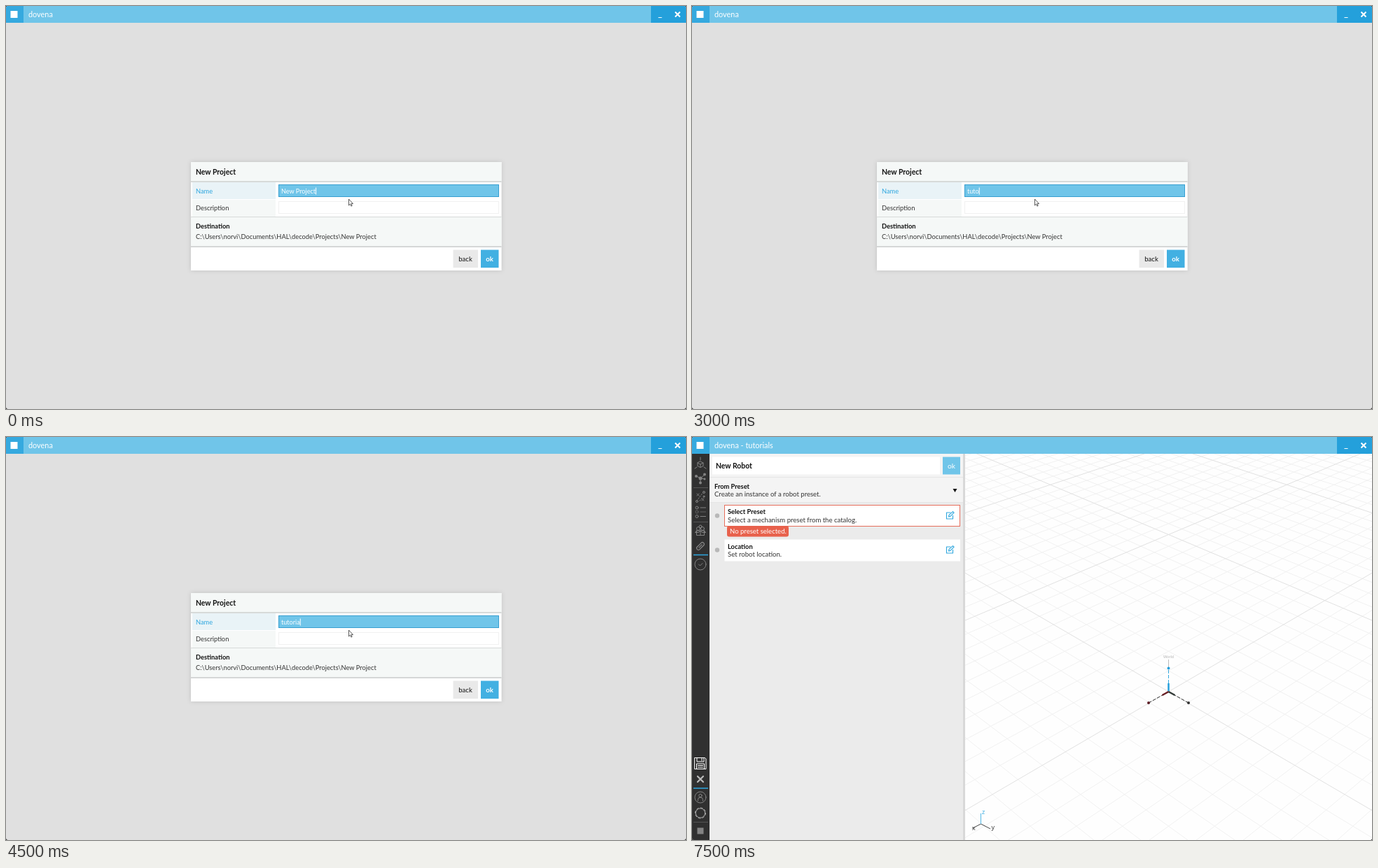
These frames come from a looping animation (971x576 px, 8000 ms). An HTML page:

```html
<!DOCTYPE html>
<html lang="en">
<head>
<meta charset="utf-8">
<title>New project dialog</title>
<style>
  html, body { margin: 0; width: 100%; height: 100%; overflow: hidden; background: #222; }
  svg { display: block; width: 100%; height: 100%; }
  text { font: 9.3px Lato, sans-serif; fill: #333; }
  .bold { font-weight: 700; fill: #111; }
  .head { font-size: 10.4px; }
  .title { font-size: 10.9px; fill: #fff; }
  .body { font-size: 9.55px; }
  .light { fill: #fff; }
  .mid { text-anchor: middle; }
  .icon { fill: none; stroke: #fff; stroke-width: 1; stroke-linecap: round; stroke-linejoin: round; }
  .solid { fill: #fff; stroke: none; }
  .minor { stroke: #f1f1f1; }
  .major { stroke: #e1e1e1; }
  .axis { font: 9px "Open Sans", sans-serif; }
</style>
</head>
<body>
<svg viewBox="0 0 971 576">
  <defs>
    <clipPath id="window"><rect width="971" height="576" rx="3"/></clipPath>
    <clipPath id="viewport"><rect x="390" y="24" width="581" height="552"/></clipPath>
    <filter id="shadow" x="-5%" y="-10%" width="110%" height="120%">
      <feDropShadow dx="0" dy="0" stdDeviation="3" flood-opacity=".14"/>
    </filter>
    <g id="edit" fill="none" stroke="currentColor" stroke-width="1.2" stroke-linejoin="round">
      <path d="M1-4H-5V5H4V0"/>
      <path d="M-2 2L-1.4-.6L4-5.4L5.6-3.8L.4 1.4Z"/>
    </g>
  </defs>

  <g clip-path="url(#window)">
    <rect width="971" height="576" fill="#e0e0e0"/>
    <rect width="971" height="24" fill="#70c5e9"/>
    <rect width="25" height="24" fill="#35a9df"/>
    <rect x="6.5" y="7" width="10" height="10" fill="#fff"/>
    <text id="title" class="title" x="32" y="16"></text>
    <rect x="921" width="50" height="24" fill="#24a0db"/>
    <path d="M931.5 16.5h5" stroke="#fff"/>
    <path d="M955.5 8.5l7 7m0-7l-7 7" stroke="#fff" stroke-width="2"/>

    <g id="dialog">
      <rect x="264" y="223" width="443.500" height="155" fill="#fff" filter="url(#shadow)"/>
      <rect x="264" y="223" width="443.500" height="27" fill="#f5f8f7"/>
      <rect x="264" y="250" width="443.500" height="2" fill="#d7dad9"/>
      <text class="bold head" x="271" y="240.500">New Project</text>
      <rect x="266" y="252" width="119" height="24" fill="#e9f3f7"/>
      <rect x="266" y="277" width="119" height="24" fill="#f5f8f7"/>
      <text x="271" y="267.500" style="fill:#2ea6df">Name</text>
      <text x="271" y="292">Description</text>
      <rect x="389.500" y="255.500" width="314" height="17" fill="#70c5e9" stroke="#379fd0"/>
      <rect x="389.500" y="279.500" width="314" height="17" fill="#fff" stroke="#f1f1f1"/>
      <text id="entry" class="light" x="393" y="267.500" style="font-size:9.1px"></text>
      <rect id="caret" y="259.500" width="1" height="10" fill="#fff"/>
      <rect x="264" y="301" width="443.500" height="42" fill="#f5f8f7"/>
      <path d="M264 301.500h443.500" stroke="#d7dad9"/>
      <rect x="264" y="343" width="443.500" height="2" fill="#d5d7d7"/>
      <text class="bold" x="271" y="318">Destination</text>
      <text x="271" y="333">C:\Users\norvi\Documents\HAL\decode\Projects\New Project</text>
      <rect x="638.500" y="348.500" width="35.500" height="25.500" fill="#e9e9e9"/>
      <rect x="678" y="348.500" width="25.500" height="25.500" fill="#42b0e2"/>
      <text class="body mid" x="656" y="365" style="fill:#111">back</text>
      <text class="bold light body mid" x="690.500" y="365" style="fill:#fff">ok</text>
      <path d="M489.500 276v9l2-1.900l1.400 3l1.300-.6l-1.400-2.900h2.700z" fill="#fff" stroke="#333" stroke-width=".8"/>
    </g>

    <g id="workspace">
      <rect x="390" y="24" width="581" height="552" fill="#fefefe"/>
      <g id="grid" clip-path="url(#viewport)"></g>
      <g fill="none" stroke="#333">
        <path id="stem" d="M680.500 318v13"/>
        <path d="M680.500 333v20" stroke="#35a9df" stroke-dasharray="5 2"/>
        <path d="M680.500 364L652 380M680.500 364L709 380" stroke-dasharray="5 2"/>
        <path d="M680.500 364l-9 5" stroke="#6a1f24" stroke-width="2.500"/>
        <path d="M680.500 364l9 5" stroke="#333b38" stroke-width="2.500"/>
        <path d="M680.500 363v-11" stroke="#259fdc" stroke-width="2.500"/>
      </g>
      <circle cx="680.500" cy="330.500" r="2" fill="#259fdc"/>
      <circle cx="652" cy="380" r="2" fill="#5e1f27"/>
      <circle cx="709" cy="380" r="2" fill="#333"/>
      <text id="world" class="mid" x="680.500" y="316" style="font:5.8px 'Liberation Sans',sans-serif">World</text>
      <path d="M412.500 553L400 559.500M412.500 553l13.500 7" stroke="#444" fill="none"/>
      <path d="M412.500 553v-15" stroke="#4fb6e5"/>
      <text class="axis" x="414" y="539" style="fill:#35a9df">z</text>
      <text class="axis" x="400" y="562">x</text>
      <text class="axis" x="427.500" y="561">y</text>

      <rect y="24" width="25" height="552" fill="#303030"/>
      <rect x="387" y="24" width="3" height="552" fill="#d8d8d8"/>
      <path d="M2 72.500h21M2 121.500h21M2 550.500h21" stroke="#555"/>
      <path d="M2 168.500h21M2 502h21" stroke="#2ea6df" stroke-width="1.500"/>
      <rect id="active" x="3" y="27" width="19" height="21" fill="#20709a"/>
      <g id="tools" class="icon">
        <path transform="translate(12 39)" d="M0-4l4 2v4.500l-4 2l-4-2v-4.500zM-4-2l4 2l4-2M0 0v4M0-10v4M5 4l3 2M-5 4l-3 2"/>
        <g transform="translate(12 59)">
          <path d="M0 0l-5.500-3M0 0l6-5M0 0l6 1M0 0v6"/>
          <g class="solid">
            <circle r="2.500"/><circle cx="-6" cy="-3" r="2"/><circle cx="6" cy="-5.500" r="2"/>
            <circle cx="6" cy="1" r="1.500"/><circle cy="6.500" r="2"/>
          </g>
        </g>
        <g transform="translate(12 85)">
          <path d="M-5-4l3 3m0-3l-3 3M2 3l3 3m0-3l-3 3"/>
          <path d="M-5 6L4-6M-1 6L6 0" stroke-dasharray="1.500 2"/>
          <circle cx="-5" cy="7" r="1.500"/><circle cx="5" cy="-6" r="1.500"/><circle cx="5" cy="0" r="1"/>
        </g>
        <g transform="translate(12 107)">
          <circle cx="-5" cy="-6" r="2"/><circle cx="-5" cy="6.500" r="2"/>
          <path d="M0-6h7.500M0 6.500h7.500"/>
          <g opacity=".6"><circle cx="-5" r="2"/><path d="M0 0h7.500"/></g>
        </g>
        <g transform="translate(12 133)">
          <path d="M-5.500 1v6.500h11V1M-5.500 1h11M-5.500 1l-2 2.500h5L0 1l2.500 2.500h5l-2-2.500M0 1v6.500"/>
          <circle cx="-3" cy="-2" r="2.500"/><circle cx="3" cy="-2" r="2.500"/><circle cy="-5" r="2"/>
        </g>
        <g transform="translate(12 156) rotate(-45)" stroke-width="1.300">
          <path d="M1 2.500H-4a2.500 2.500 0 0 1 0-5H-1M-1-2.500H4a2.500 2.500 0 0 1 0 5H1M-3 0h6"/>
        </g>
        <g transform="translate(12 182)"><circle r="8"/><path d="M-2.500 0l2 2l3.500-3.500"/></g>
      </g>
      <g class="icon" transform="translate(12 466.500)">
        <path d="M-8-8H6.500L8-6.500V8H-8ZM-5-8v5.500H5V-8M2-7v3M-5.500 8V.5h11V8M-3.500 3h7M-3.500 5.500h7"/>
      </g>
      <path d="M8 485l8 8m0-8l-8 8" stroke="#bbb" stroke-width="2.200" stroke-linecap="round"/>
      <g id="account" class="icon">
        <circle cx="12" cy="515" r="8"/><circle cx="12" cy="512.500" r="2.200"/>
        <path d="M8.500 520v-1.500a3.500 3.500 0 0 1 7 0v1.500"/>
        <rect class="solid" x="7.500" y="558.500" width="9" height="9"/>
      </g>
      <g id="gear" class="icon">
        <circle cx="12" cy="537.500" r="6.700"/>
        <circle cx="12" cy="537.500" r="7.500" stroke-dasharray="2.900 2.990"/>
      </g>

      <g id="scenePanel">
        <rect x="25" y="24" width="362" height="552" fill="#fafafa"/>
        <path d="M25 57.500h362" stroke="#e8e8e8"/>
        <rect x="29.500" y="28.500" width="269" height="24.500" fill="#cfeaf6" stroke="#55b7e3"/>
        <text x="36" y="44.500" style="font-size:9.800px;fill:#259fdc">Robot</text>
        <path d="M284.500 39h6l-3 5z" fill="#259fdc"/>
        <rect x="298.500" y="28.500" width="25.500" height="25" fill="#42b0e2"/>
        <path d="M307 41h9M311.500 36.500v9" stroke="#fff" stroke-width="1.800"/>
        <rect x="332" y="28.500" width="51" height="25" fill="#f4f4f4"/>
        <path d="M341 37l8 8m0-8l-8 8" stroke="#aaa" stroke-width="1.800"/>
        <use href="#edit" transform="translate(371 41)" color="#aaa"/>
        <text class="mid" x="206" y="320.500" style="font-size:9.700px;fill:#b0b0b0">the scene is empty</text>
      </g>

      <g id="robotPanel">
        <rect x="25" y="24" width="362" height="552" fill="#ebebeb"/>
        <rect x="25" y="24" width="362" height="69" fill="#f4f4f4"/>
        <path d="M25 57.500h362M25 93.500h362" stroke="#e5e5e5"/>
        <rect x="29" y="28.500" width="325" height="25" fill="#fff"/>
        <text class="bold head" x="34" y="44.500">New Robot</text>
        <rect x="358" y="28.500" width="25" height="25" fill="#70c5e9"/>
        <text class="mid" x="370.500" y="44.500" style="font-size:10.300px;fill:#fff">ok</text>
        <text class="bold" x="32" y="74">From Preset</text>
        <text class="body" x="32" y="84.500">Create an instance of a robot preset.</text>
        <path d="M372.500 74h6l-3 5z" fill="#111"/>
        <circle cx="36" cy="112.500" r="3.200" fill="#b8b8b8"/>
        <circle cx="36" cy="161.500" r="3.200" fill="#b8b8b8"/>
        <rect x="46.500" y="97.500" width="336" height="30" fill="#fff" stroke="#e66e5c"/>
        <text class="bold" x="51" y="110">Select Preset</text>
        <text class="body" x="51" y="121.500">Select a mechanism preset from the catalog.</text>
        <rect x="50" y="127" width="88" height="15.500" rx="3" fill="#e8614c"/>
        <text class="body" x="54" y="138" style="fill:#fff">No preset selected.</text>
        <rect x="46.500" y="146.500" width="336.500" height="31" fill="#fff"/>
        <text class="bold" x="51" y="159.500">Location</text>
        <text class="body" x="51" y="170.500">Set robot location.</text>
        <use href="#edit" transform="translate(368.500 112)" color="#35a9df"/>
        <use href="#edit" transform="translate(368.500 161)" color="#35a9df"/>
      </g>
    </g>
  </g>
</svg>
<script>
  const LOOP = 8000, OPEN = 5500, ADD = 7500;
  const WORD = 'tutorial';
  const TYPED_AT = [1000, 2000, 2500, 3000, 3500, 4000, 4500, 5000];
  const $ = id => document.getElementById(id);
  const show = (id, on) => $(id).style.display = on ? '' : 'none';

  // Ground plane in perspective: u runs to the right, v away from the viewer.
  const ORIGIN = { x: 680.5, y: 364 }, DEPTH = 1386, TILT = 0.584, CELL = 26.6;
  function project(u, v, side) {
    const scale = 1 / (1 + v / DEPTH);
    return `${ORIGIN.x + side * u * scale} ${ORIGIN.y - TILT * v * scale}`;
  }
  function gridPath(keep) {
    let d = '';
    for (let n = -12; n <= 32; n++) {
      if (!keep(n)) continue;
      const c = n * CELL;
      for (const side of [-1, 1])
        d += `M${project(-600 - c, -600 + c, side)}L${project(3000 - c, 3000 + c, side)}`;
    }
    return d;
  }
  $('grid').innerHTML =
    `<path class="minor" d="${gridPath(n => n % 10)}"/><path class="major" d="${gridPath(n => n % 10 === 0)}"/>`;

  function render(t) {
    const opened = t >= OPEN, adding = t >= ADD;
    show('dialog', !opened);
    show('workspace', opened);
    show('scenePanel', !adding);
    show('robotPanel', adding);
    show('active', !adding);
    $('title').textContent = opened ? 'dovena - tutorials' : 'dovena';

    const count = TYPED_AT.filter(at => t >= at).length;
    $('entry').textContent = count ? WORD.slice(0, count) : 'New Project';
    if (!opened) $('caret').setAttribute('x', 393 + $('entry').getComputedTextLength());

    $('tools').style.opacity = $('account').style.opacity = adding ? 0.4 : 1;
    $('gear').style.opacity = adding ? 0.6 : 0.4;
    $('world').style.fill = adding ? '#b5b5b5' : '#111';
    $('stem').style.stroke = adding ? '#bbb' : '#333';
  }

  const start = performance.now();
  let last = '';
  function tick() {
    const t = (performance.now() - start) % LOOP;
    const step = [...TYPED_AT, OPEN, ADD].filter(at => t >= at).length;
    if (step !== last) render(t);
    last = step;
    requestAnimationFrame(tick);
  }
  tick();
</script>
</body>
</html>
```
